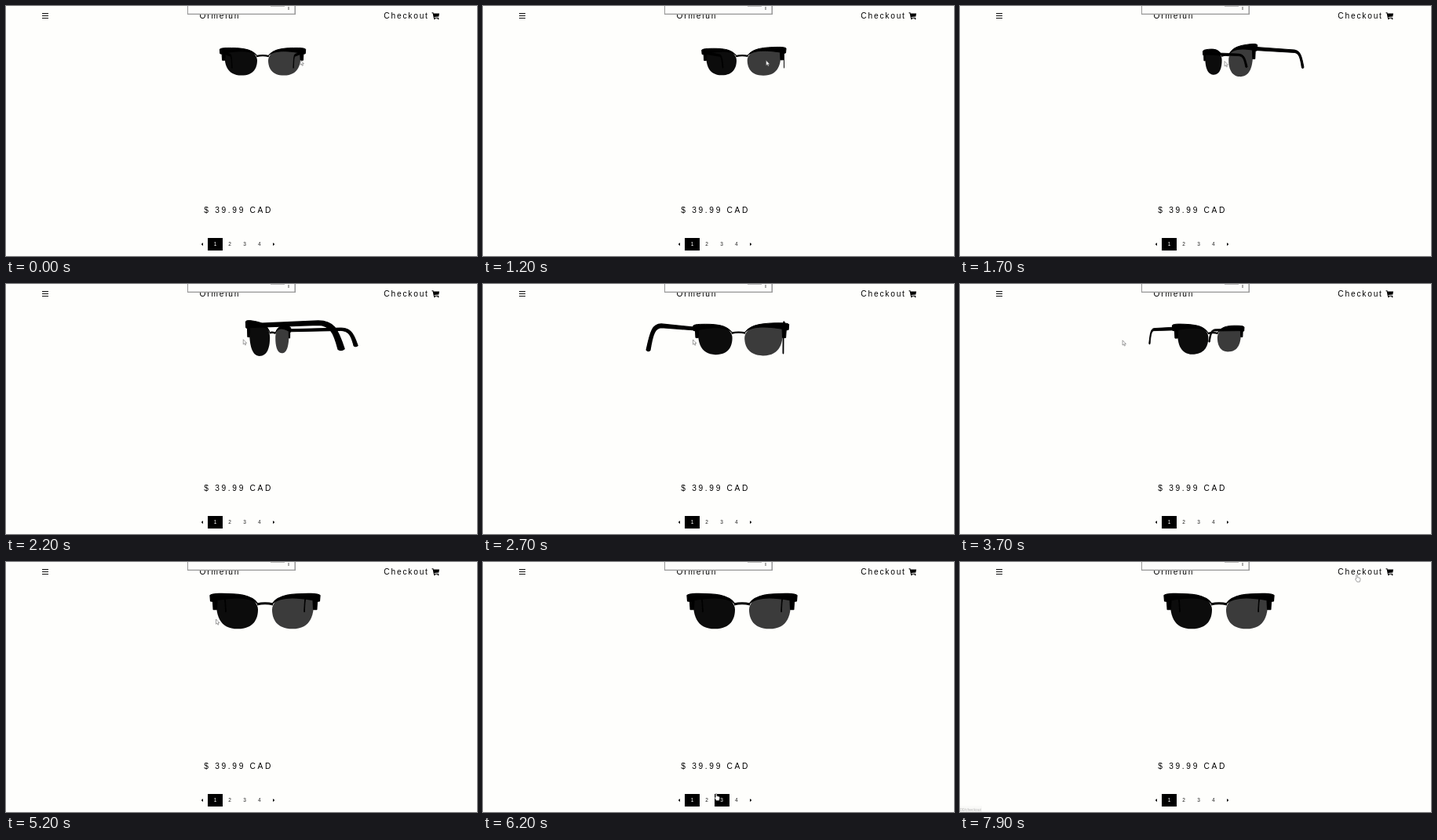
An HTML page for the animation above (8 s loop, 600 by 319 pixels).

```html
<!DOCTYPE html>
<html lang="en">
<head>
<meta charset="utf-8">
<title>Eyewear viewer</title>
<style>
  html, body { margin: 0; width: 100%; height: 100%; overflow: hidden; background: #fefefc; }
  svg { display: block; width: 100vw; height: 100vh; font-family: "Liberation Sans", Arial, sans-serif; }
  .label { font-size: 10.2px; letter-spacing: 1.8px; }
  .price { letter-spacing: 2.68px; }
  .pages { font-size: 6.5px; text-anchor: middle; fill: #222; }
</style>
</head>
<body>
<svg viewBox="0 0 600 319">
  <rect width="600" height="319" fill="#fefefc"/>
  <path d="M46 9.5h8M46 12.5h8M46 15.5h8" stroke="#111"/>
  <g class="label">
    <text x="246.5" y="16">Ormelun</text>
    <text x="481.3" y="16">Checkout</text>
    <text x="252.3" y="264" class="price">$ 39.99 CAD</text>
  </g>
  <path d="M542.5 8.3h1.9l.3 1.1h7.3l-.7 4.1-5.7.6.2.7h5.3v.9h-6.2l-1.3-6.4h-1.1z"/>
  <circle cx="546" cy="16.3" r=".9"/><circle cx="550.6" cy="16.3" r=".9"/>

  <rect x="231" y="-2" width="138" height="13" fill="#999"/>
  <rect x="232" y="-2" width="135.5" height="11.7" fill="#fcfcfb"/>
  <path d="M337 .3h18" stroke="#999" stroke-width=".8"/>
  <path d="M360 1v4" stroke="#777" stroke-width="1.2"/>

  <path d="M251 302v4l-2.3-2zM340 302v4l2.3-2z"/>
  <rect x="257" y="296" width="19" height="16"/>
  <rect id="hover" x="295" y="296" width="19" height="16"/>
  <g class="pages">
    <text x="266.5" y="306.3" style="fill:#fff">1</text>
    <text x="285" y="306.3">2</text>
    <text id="three" x="304" y="306.3">3</text>
    <text x="322.7" y="306.3">4</text>
  </g>

  <g id="glasses" stroke-linejoin="round"></g>

  <g id="status">
    <rect y="311.5" width="28" height="7.5" fill="#f9f9f7"/>
    <text y="317.6" font-size="5" fill="#b4b4b4">00/checkout</text>
  </g>
  <g id="cursor" stroke="#666" stroke-width=".6" fill="#fff" stroke-linejoin="round">
    <path id="arrow" d="M0 0V6.2L1.4 5 2.4 7.2 3.4 6.8 2.5 4.6H4.4Z"/>
    <path id="hand" d="M1.3.8Q2.2 0 2.8.8V3.6L6 4.4Q6.6 5 6.4 6.5L5.7 9.3H2.2L.2 6.2Q0 5 1.3 5.4Z"/>
  </g>
</svg>
<script>
const $ = id => document.getElementById(id);
const LOOP = 8000, STEP = 100, CAMERA = 260, PIVOT = 18;

const progress = (t, from, to) => Math.min(1, Math.max(0, (t - from) / (to - from)));
const smooth = p => p * p * (3 - 2 * p);

// Cursor stops: time, x, y
const stops = [
  [900, 375, 69], [1700, 337, 70.5], [2700, 267.5, 71], [3900, 195, 72], [4500, 267.5, 73],
  [5200, 267.5, 73], [6100, 295, 295], [6900, 295, 295], [7800, 503.5, 16]
];

// Lateral and vertical coordinates; mirrored for the other side
const LENS = "M51.5 -14C53 3 49 18.7 29 18.7C12 18.7 7.5 8 7.5 -2C7.5 -8 14 -15 22 -17Z";
const BROW = "M58.5 -17Q57 -18.7 49 -18.8C30 -19 15 -18 8 -8.5C14 -14 26 -16.5 51 -12"
  + "L51.5 -2L55 -2L55.5 -10.5L58 -11Z";
const BRIDGE = "M8.5 -7.5Q0 -9.5 -8.5 -7.5";
// Depth and vertical coordinates
const ARM = "M0 -15L70 -14.7C82 -14 85 -8 90 8Q88 10 85.5 8.5C82 -6 79 -10.5 70 -11.3L0 -11.5Z";

function drawGlasses(t) {
  // One full turn, then a quick zoom in
  const turn = smooth(progress(t, 780, 4440)), zoom = 1 + .28 * progress(t, 4500, 4700);
  const c = Math.cos(turn * 2 * Math.PI), s = Math.sin(turn * 2 * Math.PI);
  const cx = 327 + 3 * turn - 5 * s, cy = 70.6 - 20 * (zoom - 1);
  const pitch = -.03 + .07 * turn + .2 * (zoom - 1);

  const project = (u, v, w) => {
    const d = w + PIVOT, z = u * s - d * c, k = zoom * CAMERA / (CAMERA - z);
    return [cx + (u * c + d * s) * k, cy + (v + pitch * z) * k, k];
  };
  const trace = (shape, place) => shape.replace(/(-?[\d.]+) (-?[\d.]+)/g, (_, a, b) => {
    const [x, y] = project(...place(+a, +b));
    return x.toFixed(2) + " " + y.toFixed(2);
  });
  const path = (d, fill, width) =>
    `<path d="${d}" fill="${fill}" stroke="${width ? "#000" : "none"}" stroke-width="${width}"/>`;
  const front = side => (a, b) => [a * side, b, 0];
  // The side further from the viewer goes first
  const each = draw => (s > 0 ? [-1, 1] : [1, -1]).map(draw).join("");

  $("glasses").innerHTML =
    each(m => path(trace(LENS, front(m)), m * c > 0 ? "#3b3b3b" : "#0c0c0c", 0)) +
    path(trace(BRIDGE, front(1)), "none", 2.4 * zoom) +
    each(m => path(trace(ARM, (a, b) => [55 * m, b, a]), "#000", project(55 * m, 0, 70)[2])) +
    each(m => path(trace(BROW, front(m)), "#000", zoom));
}

function cursorAt(t) {
  const i = stops.findIndex(stop => stop[0] > t);
  if (i < 1) return stops[i ? stops.length - 1 : 0].slice(1);
  const [from, x, y] = stops[i - 1], [to, x2, y2] = stops[i];
  const linear = progress(t, from, to), p = y === y2 || Math.abs(y2 - y) < 9 ? linear : smooth(linear);
  return [x + (x2 - x) * p, y + (y2 - y) * p];
}

const show = (id, opacity) => $(id).setAttribute("opacity", +opacity);

function frame(now) {
  const t = Math.floor(now % LOOP / STEP) * STEP;
  drawGlasses(t);
  $("cursor").setAttribute("transform", `translate(${cursorAt(t)})`);
  const hover = t >= 6100 && t < 7000, pointing = hover || t >= 7900;
  show("arrow", !pointing);
  show("hand", pointing);
  show("hover", hover && progress(t, 6000, 6200));
  $("three").style.fill = hover ? "#fff" : "#222";
  show("status", t >= 7900);
  requestAnimationFrame(frame);
}
frame(0);
</script>
</body>
</html>
```
